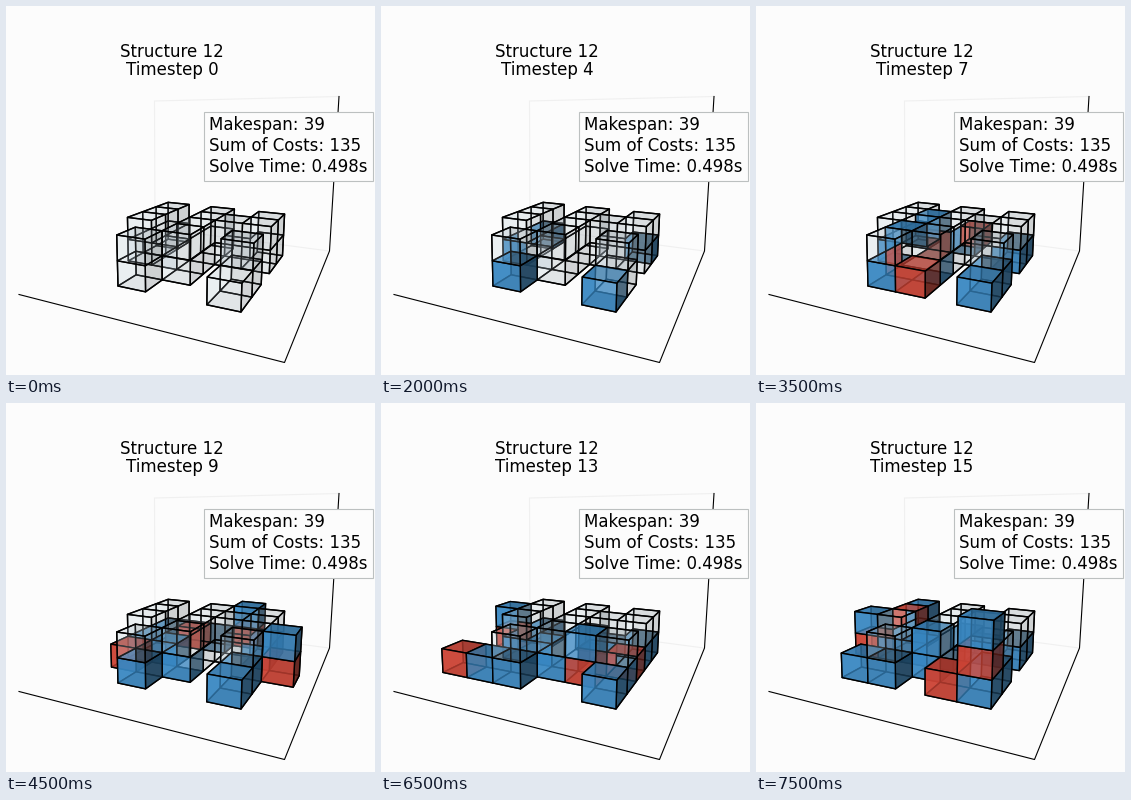
A matplotlib script for the animation above (8000 ms loop, 369 px wide and 369 px high).

```python
import numpy as np
import matplotlib.pyplot as plt
from matplotlib.animation import FuncAnimation
from matplotlib.collections import PolyCollection
from matplotlib.patches import Rectangle

SIZE, DPI = 369, 100
STEPS, STEP_MS = 16, 500
BG = "#fcfcfc"

# Perspective camera: rows give u*w, v*w and w for (x, y, z, 1)
CAM = np.array([
    [22.94, 27.77, -1.907, 112.0],
    [-3.66, 8.80, -28.13, 280.0],
    [-0.0332, 0.0744, -0.0115, 1.0],
])

# Base colour and opacity
GHOST = ((0.85, 0.92, 0.97), 0.15)
BLOCK = ((0.25, 0.60, 0.86), 0.75)
ROBOT = ((0.906, 0.298, 0.235), 0.78)

# Cells of the finished structure as (x, y, height)
PLAN = [(-1, 2, 2), (-1, 3, 2), (-1, 4, 2), (0, 0, 2), (0, 2, 1),
        (1, 1, 2), (1, 2, 2), (1, 3, 2), (1, 4, 2), (2, 3, 2),
        (3, 0, 1), (3, 1, 2), (3, 3, 2), (3, 4, 2)]

# Blocks set down at each step
PLACED = {
    2: [(0, 0, 0), (3, 0, 0), (-1, 2, 0), (-1, 4, 0), (3, 4, 0)],
    6: [(3, 1, 0), (3, 3, 0)],
    7: [(1, 1, 0), (1, 4, 0)],
    8: [(0, 2, 0), (-1, 3, 0)],
    11: [(2, 3, 0)],
    12: [(1, 2, 0)],
    13: [(-1, 0, 0)],
    14: [(1, 1, 1)],
    15: [(-1, 4, 1)],
}


def visit(start, x, y):
    """A robot that arrives loaded, unloads beside itself and leaves."""
    return start, [(x, y, 0)] * 2, 1


# Robots: first step, path, number of steps spent carrying a block
ROBOTS = [
    visit(1, 0, -1), visit(1, 3, -1), visit(1, -2, 2),
    visit(1, -2, 4), visit(1, 3, 5),
    visit(5, 4, 1), visit(5, 4, 3), visit(6, 1, 5), visit(12, -2, 0),
    (5, [(1, -1, 0), (1, 0, 0), (1, 0, 0), (1, -1, 0)], 2),
    (5, [(-2, 1, 0), (-1, 1, 0), (0, 1, 0),
         (0, 1, 0), (-1, 1, 0), (-2, 1, 0)], 3),
    (5, [(0, 5, 0), (0, 4, 0), (0, 3, 0),
         (0, 3, 0), (0, 4, 0), (0, 5, 0)], 3),
    (9, [(4, 2, 0), (3, 2, 0), (2, 2, 0),
         (2, 2, 0), (3, 2, 0), (4, 2, 0)], 3),
    (9, [(2, 5, 0), (2, 4, 0), (2, 4, 0), (2, 5, 0)], 2),
    (11, [(4, 1, 0), (3, 1, 1), (2, 1, 0), (2, 1, 0), (2, 0, 0)], 3),
    (13, [(-2, 3, 0), (-1, 3, 1), (-1, 3, 1)], 2),
    (14, [(3, -1, 0), (3, 0, 1)], 2),
    (15, [(-2, 2, 0)], 1),
]

LIGHT = np.array([-2, -2, 1]) / 3


def make_sides():
    """Unit cube sides as (normal, corners, shade)."""
    sides = []
    for axis in range(3):
        a, b = [i for i in range(3) if i != axis]
        for end in (0, 1):
            quad = np.zeros((4, 3))
            quad[:, axis] = end
            quad[:, a] = [0, 1, 1, 0]
            quad[:, b] = [0, 0, 1, 1]
            normal = np.zeros(3, int)
            normal[axis] = 2 * end - 1
            shade = 0.3 + 0.35 * (normal @ LIGHT + 1)
            sides.append((normal, quad, shade))
    return sides


SIDES = make_sides()


def project(pts):
    u, v, w = CAM @ np.c_[pts, np.ones(len(pts))].T
    return np.c_[u / w, v / w]


def depth(p):
    return CAM[2, :3] @ np.asarray(p)


def scene(step):
    """Map every filled cell to its style."""
    cells = {(x, y, z): GHOST for x, y, h in PLAN for z in range(h)}
    for when, spots in PLACED.items():
        if when <= step:
            cells.update((spot, BLOCK) for spot in spots)
    for start, path, loaded in ROBOTS:
        k = step - start
        if 0 <= k < len(path):
            x, y, z = path[k]
            cells[x, y, z] = ROBOT
            if k < loaded:
                cells[x, y, z + 1] = BLOCK
    return cells


def build(step):
    cells = scene(step)
    polys, colors = [], []
    for cell in sorted(cells, key=depth, reverse=True):
        base, alpha = cells[cell]
        pos = np.array(cell)
        for normal, quad, shade in sorted(
                SIDES, key=lambda s: -depth(s[1].mean(axis=0))):
            if tuple(int(c) for c in pos + normal) in cells:
                continue
            polys.append(project(quad + pos))
            colors.append((*(shade * c for c in base), alpha))
    return polys, colors


fig = plt.figure(figsize=(SIZE / DPI, SIZE / DPI), dpi=DPI, facecolor=BG)
ax = fig.add_axes([0, 0, 1, 1])
ax.set_xlim(0, SIZE)
ax.set_ylim(SIZE, 0)
ax.axis("off")

# Back wall edges, then the three axis lines
ax.plot([333, 148.5, 149, 323], [90.5, 95, 222, 245],
        color="#f0f0f0", lw=0.8, zorder=1)
ax.plot([13, 278.5, 323.5, 333], [288.5, 356.5, 245, 90.5],
        color="black", lw=0.8, zorder=1)

cubes = PolyCollection([], edgecolors="black", linewidths=1.0,
                       joinstyle="round", zorder=2)
ax.add_collection(cubes, autolim=False)

ax.add_patch(Rectangle((198, 105.5), 169, 69.5, fc=BG, ec="#bcc0c0",
                       lw=0.8, zorder=3))
ax.text(203, 166, "Makespan: 39\nSum of Costs: 135\nSolve Time: 0.498s",
        fontsize=12, va="baseline", zorder=4)
ax.text(166, 51, "Structure 12", fontsize=12, ha="center", va="baseline")
label = ax.text(166, 69, "", fontsize=12, ha="center", va="baseline")


def update(step):
    polys, colors = build(step)
    cubes.set_verts(polys)
    cubes.set_facecolor(colors)
    label.set_text(f"Timestep {step}")
    return cubes, label


anim = FuncAnimation(fig, update, frames=STEPS, interval=STEP_MS,
                     repeat=True, repeat_delay=0, blit=False)
plt.show()
```
